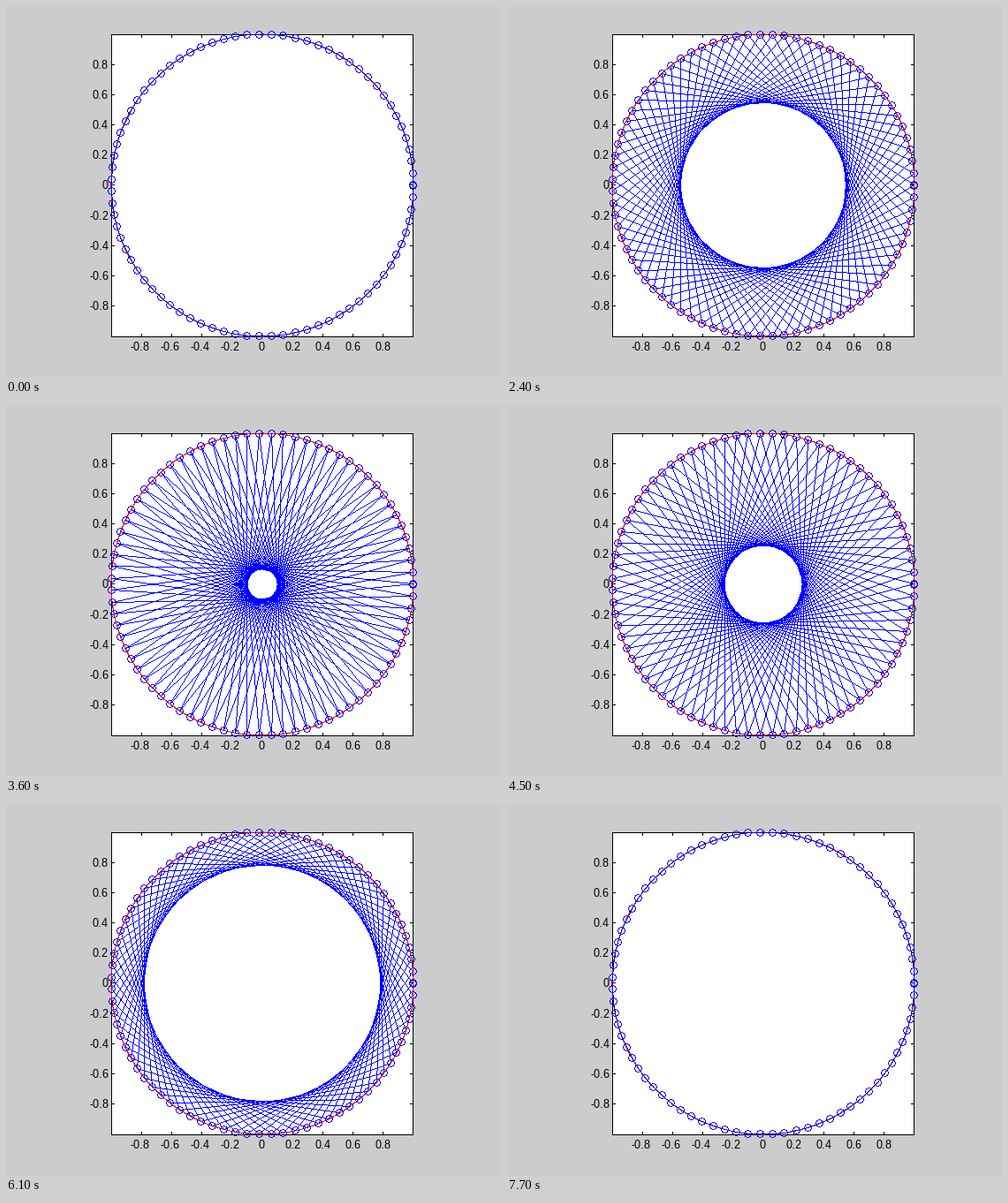
Write a matplotlib script that moves like this. It is 560x420 px and loops after 7.8 s.

```python
import numpy as np
import matplotlib.pyplot as plt
from matplotlib.animation import FuncAnimation

W, H, DPI = 560, 420, 80
N = 79                                   # distinct points on the circle
LEFT, RIGHT, TOP, BOTTOM = 119, 460, 32, 374
CX, CY, R = 289.47, 202, 171.01
GRAY, WHITE, BLACK = (204,) * 3, (255,) * 3, (0,) * 3
RED, BLUE = (255, 0, 0), (0, 0, 255)
TICKS = np.arange(-4, 5) / 5

plt.rcParams.update({"text.hinting": "native", "text.hinting_factor": 1})


def to_px(x, y):
    return (np.rint(CX + R * x).astype(int),
            np.ceil(CY - R * y).astype(int))


def circle(count):
    """Closed circle: the last point falls on the first."""
    a = np.linspace(0, 2 * np.pi, count + 1)
    return to_px(np.cos(a), np.sin(a))


def line(img, x0, y0, x1, y1, color):
    """Crisp one-pixel line without smoothing."""
    t = np.linspace(0, 1, max(abs(x1 - x0), abs(y1 - y0)) + 1)
    xs = np.floor(x0 + (x1 - x0) * t + 0.5).astype(int)
    ys = np.floor(y0 + (y1 - y0) * t + 0.5).astype(int)
    img[ys, xs] = color


def background():
    img = np.empty((H, W, 3), np.uint8)
    img[:] = GRAY
    img[TOP:BOTTOM + 1, LEFT:RIGHT + 1] = WHITE
    img[[TOP, BOTTOM], LEFT:RIGHT + 1] = BLACK
    img[TOP:BOTTOM + 1, [LEFT, RIGHT]] = BLACK
    for x, y in zip(*to_px(TICKS, TICKS)):
        img[TOP:TOP + 4, x] = img[BOTTOM - 3:BOTTOM + 1, x] = BLACK
        img[y, LEFT:LEFT + 4] = img[y, RIGHT - 3:RIGHT + 1] = BLACK
    xs, ys = circle(4000)
    img[ys, xs] = RED
    return img


def ring():
    dy, dx = np.mgrid[-4:5, -4:5]
    keep = np.abs(np.hypot(dx, dy) - 4) < 0.42
    return dx[keep], dy[keep]


PX, PY = circle(N)
RING_X, RING_Y = ring()
BASE = background()


def render(step):
    img = BASE.copy()
    for i in range(N):
        j = (i + step) % N
        line(img, PX[i], PY[i], PX[j], PY[j], BLUE)
    img[PY[:, None] + RING_Y, PX[:, None] + RING_X] = BLUE
    return img


fig = plt.figure(figsize=(W / DPI, H / DPI), dpi=DPI)
ax = fig.add_axes([0, 0, 1, 1])
ax.axis("off")
picture = ax.imshow(render(1), interpolation="nearest", aspect="auto")
ax.set_xlim(-0.5, W - 0.5)
ax.set_ylim(H - 0.5, -0.5)

font = dict(family="Liberation Sans", size=11.7, color="black", va="baseline")
for v in TICKS:
    label = f"{v:g}"
    x, y = to_px(v, v)
    shift = 2.2 if v < 0 else 0          # digits stay centred, sign hangs left
    ax.text(x - shift, 390, label, ha="center", **font)
    ax.text(115.5, y + 5, label, ha="right", **font)


def update(frame):
    picture.set_data(render(frame + 1))
    return picture,


anim = FuncAnimation(fig, update, frames=N - 1, interval=100, repeat=True)
plt.show()
```
